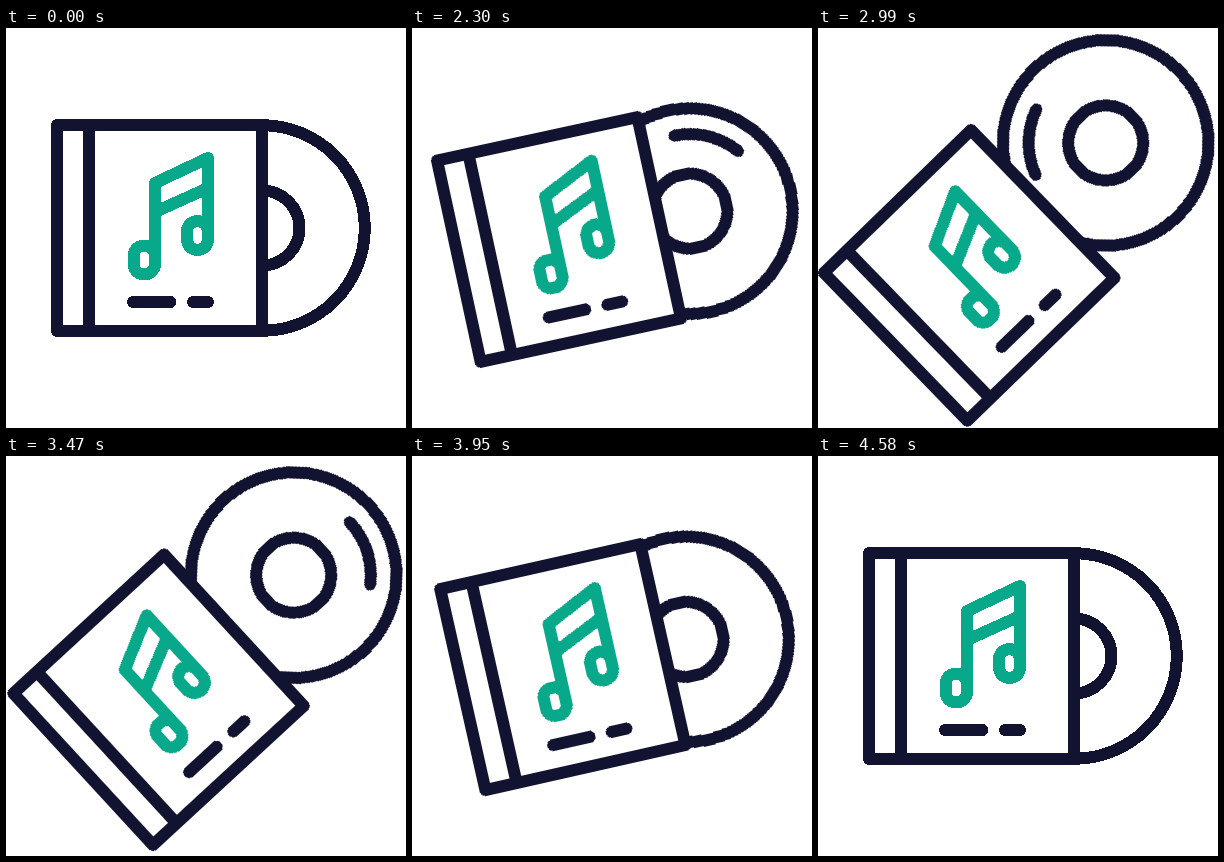
An HTML page that plays this animation: 400x400 px, repeating every 4610 ms.

```html
<!DOCTYPE html>
<html lang="en">
<head>
<meta charset="utf-8">
<title>Music album</title>
<style>
  html, body { margin: 0; width: 100%; height: 100%; overflow: hidden; background: #fff; }
  svg { display: block; width: 100%; height: 100%; }

  .icon {
    fill: none;
    stroke: #121331;
    stroke-width: 12;
    stroke-linecap: round;
    stroke-linejoin: round;
    shape-rendering: crispEdges;
  }
  .note { stroke: #08a88a; }
  .cover { fill: #fff; }

  .icon, .disc, .spin, .case { animation: 4610ms linear infinite; }
  .icon { transform-origin: 200px 200px; animation-name: tilt; }
  .disc { animation-name: eject; }
  .spin { transform-origin: 256px 200px; animation-name: spin; }
  .case { animation-name: recoil; }

  @keyframes tilt {
    0% { transform: rotate(0deg); }
    43.3% { transform: rotate(0deg); animation-timing-function: cubic-bezier(.36, 0, .23, 1); }
    69.41% { transform: rotate(-45deg); animation-timing-function: cubic-bezier(.78, 0, .68, 1); }
    91.11% { transform: rotate(1.9deg); animation-timing-function: ease-in-out; }
    99.3%, 100% { transform: rotate(0deg); }
  }
  @keyframes eject {
    0% { transform: translateX(0); }
    43.38% { transform: translateX(0); animation-timing-function: cubic-bezier(.35, 0, .29, 1); }
    65.08% { transform: translateX(66.2px); }
    69.41% { transform: translateX(66.2px); animation-timing-function: cubic-bezier(.87, 0, .69, 1); }
    90.24%, 100% { transform: translateX(0); }
  }
  @keyframes recoil {
    0% { transform: translateX(0); }
    43.38% { transform: translateX(0); animation-timing-function: cubic-bezier(.35, 0, .29, 1); }
    65.08% { transform: translateX(-21.5px); }
    69.41% { transform: translateX(-21.5px); animation-timing-function: cubic-bezier(.36, 0, .78, 1); }
    90.24%, 100% { transform: translateX(0); }
  }
  @keyframes spin {
    0% { transform: rotate(0deg); }
    43.53% { transform: rotate(0deg); animation-timing-function: cubic-bezier(.37, 0, .63, 1); }
    65.23% { transform: rotate(360deg); animation-timing-function: cubic-bezier(.37, 0, .63, 1); }
    86.92%, 100% { transform: rotate(720deg); }
  }
</style>
</head>
<body>
<svg viewBox="0 0 400 400">
  <g class="icon">
    <g class="disc">
      <circle cx="256" cy="200" r="102.8"/>
      <circle cx="256" cy="200" r="37.5"/>
      <path class="spin" d="M183.6 173.7A77 77 0 0 1 229.7 127.6"/>
    </g>
    <g class="case">
      <path class="cover" d="M51 97H256V303H51Z"/>
      <path d="M83 97V303M127 274H164.5M187 274H202"/>
      <g class="note">
        <path d="M149 232V155L202 130V207M149 184L202 160"/>
        <rect x="127.5" y="217.5" width="21.5" height="29" rx="10.75"/>
        <rect x="181" y="193" width="21" height="29" rx="10.5"/>
      </g>
    </g>
  </g>
</svg>
</body>
</html>
```
